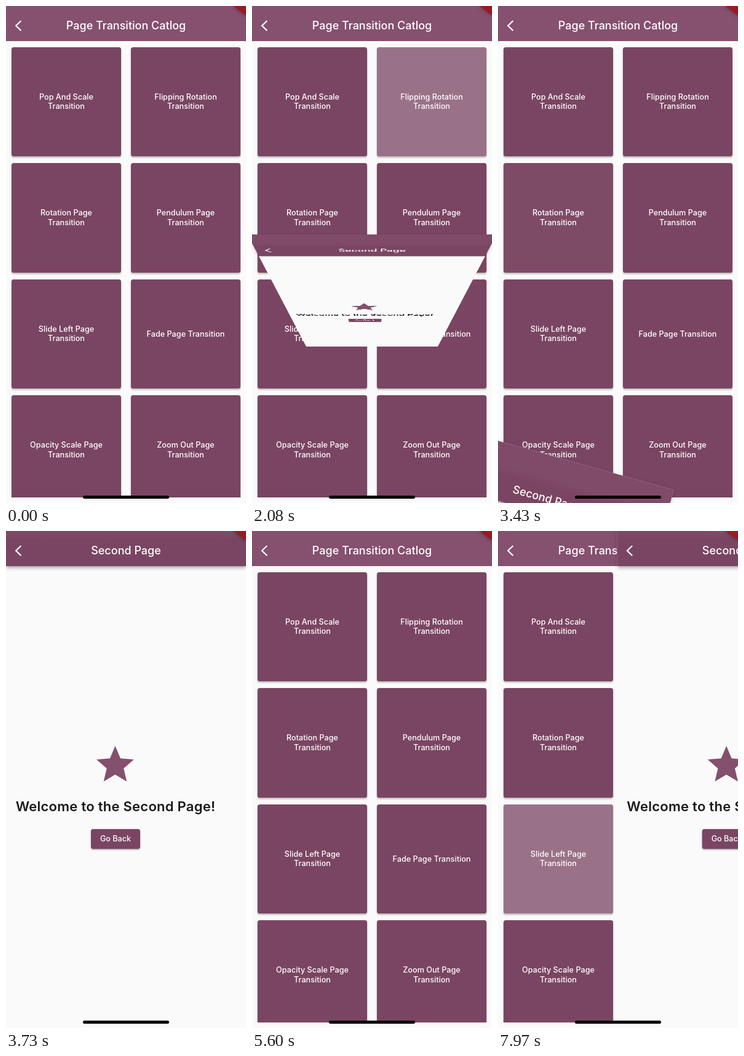
Recreate the animation shown at these times as an HTML page. Size 390 px wide and 807 px high, loop 8 s.

```html
<!DOCTYPE html>
<html lang="en">
<head>
<meta charset="utf-8">
<title>Page transitions</title>
<style>
  html, body { margin: 0; width: 100%; height: 100%; overflow: hidden; background: #fafafa; }
  body { position: relative; font: 500 12.6px/15.5px Inter, Roboto, sans-serif; color: #fff; }
  div, svg { position: absolute; }
  #stage { left: 0; top: 0; width: 390px; height: 807px; overflow: hidden; background: #fafafa; }
  .title { left: 0; width: 390px; text-align: center; font-size: 18px; line-height: 24px; }
  .chevron { left: 10px; width: 20px; height: 20px; fill: none; stroke: #fff; stroke-width: 2.2; }
  #catalogBar { left: 0; top: 0; width: 390px; height: 57px; background: #86506f; }
  #grid { left: 0; top: 57px; width: 390px; height: 741px; overflow: hidden; }
  .card { width: 178px; height: 177.5px; border-radius: 3.6px; background: #7a4562;
    box-shadow: 0 2px 3px rgba(0,0,0,.28); overflow: visible;
    display: flex; align-items: center; justify-content: center; text-align: center; white-space: pre; }
  .glow { inset: 0; border-radius: inherit; background: #fff; opacity: 0; }
  .card span { position: relative; letter-spacing: .03px; }
  /* The page reaches above the stage, under the cropped status bar. */
  #page { left: 0; top: -37px; width: 390px; height: 844px; background: #fafafa; }
  #pageBar { left: 0; top: 0; width: 390px; height: 94px;
    background: linear-gradient(#804a69 37px, #7a4562 51px);
    box-shadow: 0 2px 4px -1px rgba(0,0,0,.2), 0 4px 5px rgba(0,0,0,.14), 0 1px 9px rgba(0,0,0,.12); }
  #ripple { left: -15.5px; top: -15.5px; width: 31px; height: 31px; border-radius: 50%; background: #fff; }
  #star { left: 141.3px; top: 380px; width: 72.9px; height: 72.9px; fill: #854f6e; }
  #welcome { left: 0; top: 470px; width: 356px; text-align: center; white-space: nowrap;
    font-size: 22px; font-weight: 600; line-height: 28px; letter-spacing: .26px; color: #1a171b; }
  #button { left: 138px; top: 521px; width: 80px; height: 32px; border-radius: 3.6px; line-height: 32px;
    text-align: center; background: #7a4562;
    box-shadow: 0 3px 1px -2px rgba(0,0,0,.2), 0 2px 2px rgba(0,0,0,.14), 0 1px 5px rgba(0,0,0,.12); }
  #corner { left: 360px; top: 0; width: 30px; height: 25px; overflow: visible;
    fill: #991b20; filter: drop-shadow(0 0 3px rgba(0,0,0,.4)); }
  #home { left: 125px; top: 795px; width: 140px; height: 5px; border-radius: 3px; background: #000; }
</style>
</head>
<body>
<div id="stage">
  <div id="grid"></div>
  <div id="catalogBar">
    <svg class="chevron" style="top:22px" viewBox="10 22 20 20"><path d="M24.5 24 16.2 32l8.3 8"/></svg>
    <div class="title" style="top:20px">Page Transition Catlog</div>
  </div>
  <div id="page">
    <div id="pageBar">
      <svg class="chevron" style="top:59px" viewBox="10 22 20 20"><path d="M24.5 24 16.2 32l8.3 8"/></svg>
      <div class="title" style="top:57px">Second Page</div>
      <div id="ripple"></div>
    </div>
    <svg id="star" viewBox="0 0 24 24"><path d="M12 17.27 18.18 21l-1.64-7.03L22 9.24l-7.19-.61L12 2 9.19 8.63 2 9.24l5.46 4.73L5.82 21z"/></svg>
    <div id="welcome">Welcome to the Second Page!</div>
    <div id="button">Go Back</div>
  </div>
  <svg id="corner" viewBox="0 0 30 25"><path d="M10 0 31 16.5V-2H10z"/></svg>
  <div id="home"></div>
</div>
<script>
const LOOP = 8000, DURATION = 300, PAGE_HEIGHT = 844, WIDTH = 390;
const byId = id => document.getElementById(id);
const clamp = v => Math.min(1, Math.max(0, v));

const labels = ['Pop And Scale\nTransition', 'Flipping Rotation\nTransition',
  'Rotation Page\nTransition', 'Pendulum Page\nTransition',
  'Slide Left Page\nTransition', 'Fade Page Transition',
  'Opacity Scale Page\nTransition', 'Zoom Out Page\nTransition'];

const glows = labels.map((label, i) => {
  const card = document.createElement('div');
  const glow = document.createElement('div');
  const text = document.createElement('span');
  card.className = 'card';
  glow.className = 'glow';
  text.textContent = label;
  card.style.left = (i % 2 ? 203 : 9) + 'px';
  card.style.top = 9.5 + 188.5 * Math.floor(i / 2) + 'px';
  card.append(glow, text);
  byId('grid').append(card);
  return glow;
});

// cubic-bezier(0, 0, .58, 1)
function easeOut(x) {
  let low = 0, high = 1;
  for (let i = 0; i < 24; i++) {
    const t = (low + high) / 2;
    if (1.74 * t * t * (1 - t) + t ** 3 < x) low = t; else high = t;
  }
  return low * low * (3 - 2 * low);
}

const rise = x => `translateY(${PAGE_HEIGHT * (1 - easeOut(x))}px)`;
const popScale = x => `scale(${easeOut(x)}) ${rise(x)}`;
const flip = x => `perspective(911px) rotateX(${-180 * x}deg) ${rise(x)}`;
const spin = x => `rotate(${360 * x}deg) ${rise(x)}`;
const slideLeft = x => `translateX(${WIDTH * (1 - x)}px)`;

// One visit per card, in card order; touch is where the back button is pressed.
const visits = [
  { move: popScale, tap: 250, open: 345, close: 1353, touch: [31, 68] },
  { move: flip, tap: 1968, open: 1968, close: 2792.5, touch: [32, 78] },
  { move: spin, tap: 3418, open: 3418, close: 5287, touch: [27, 72] },
  { move: rise, tap: 5898, open: 5898, close: 6669, touch: [24, 75] },
  { move: slideLeft, tap: 7810, open: 7820, close: Infinity, touch: [0, 0] }
];

function draw(t) {
  const page = byId('page'), ripple = byId('ripple'), home = byId('home');
  page.style.display = 'none';
  home.style.opacity = 1;
  visits.forEach(({ move, tap, open, close, touch: [x, y] }, i) => {
    const opened = clamp((t - open) / DURATION);
    const closed = clamp((t - close) / DURATION);
    const shown = opened - closed;
    glows[i].style.opacity = t < close ? .24 * clamp((t - tap) / 100) : 0;
    if (shown <= 0) return;

    page.style.display = 'block';
    page.style.transform = shown < 1 || move === flip ? move(shown) : 'none';
    ripple.style.opacity = t >= close ? .26 * (1 - closed) : 0;
    ripple.style.transform = `translate(${x}px, ${y}px) scale(${1 + .3 * closed})`;
    // The home bar pales over the upside-down header.
    if (move === flip && shown > .85) home.style.opacity = .53;
  });
}

function frame() {
  draw(performance.now() % LOOP);
  requestAnimationFrame(frame);
}
frame();
</script>
</body>
</html>
```
